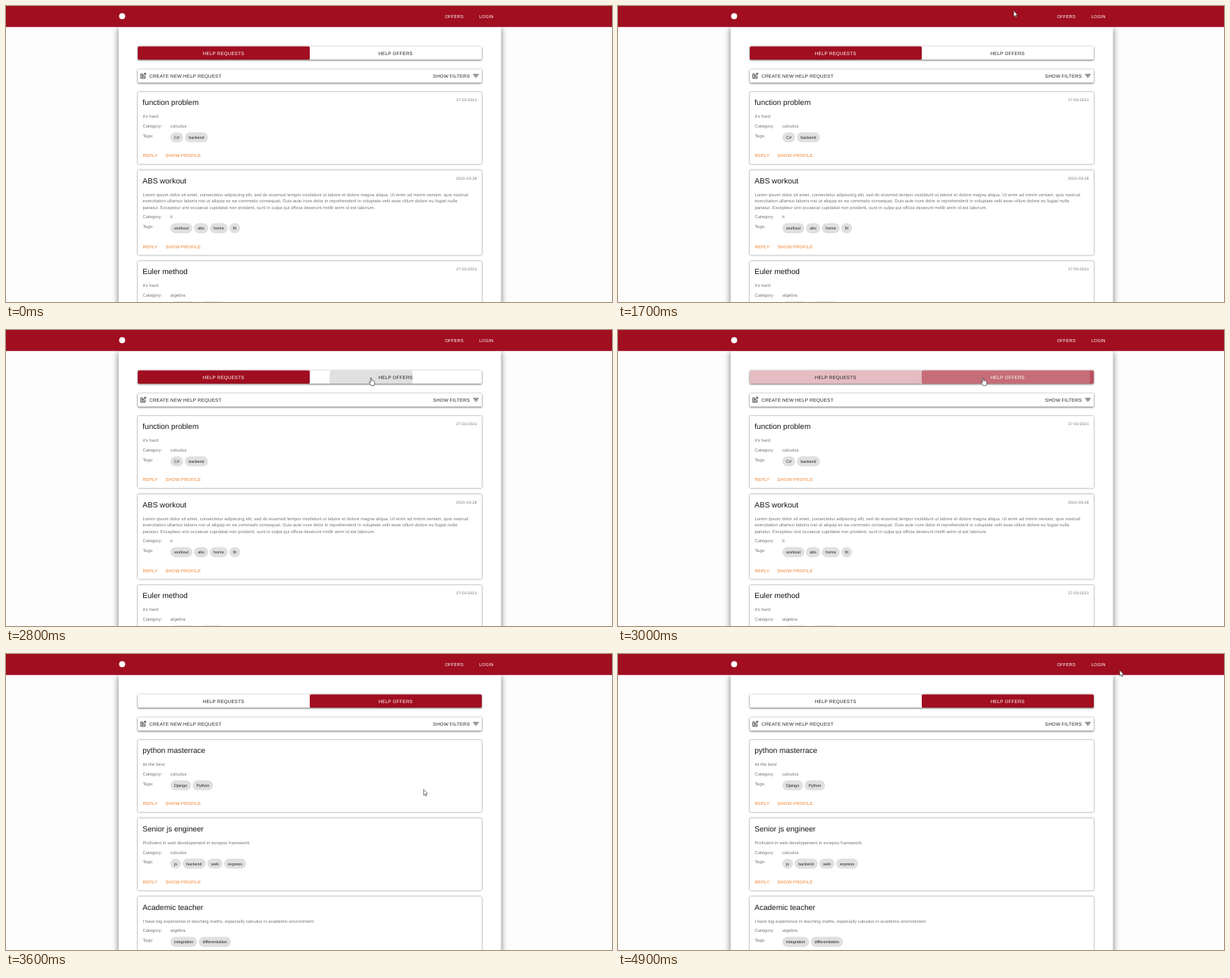
These frames come from a looping animation (800x392 px, 5 s). An HTML page:

```html
<!DOCTYPE html>
<html lang="en">
<head>
<meta charset="utf-8">
<title>Help board</title>
<style>
  html, body { margin: 0; width: 100%; height: 100%; overflow: hidden; background: #fefdfe; }
  svg { display: block; width: 100vw; height: 100vh; }
  text { font-family: "Liberation Sans", Arial, sans-serif; text-rendering: geometricPrecision; white-space: pre; }
  .paper { fill: #fff; filter: drop-shadow(0 .9px .9px rgba(0,0,0,.36)) drop-shadow(0 0 .8px rgba(0,0,0,.2)); }
  .bar { fill: #fff; filter: drop-shadow(0 1px 1.2px rgba(0,0,0,.45)) drop-shadow(0 0 1px rgba(0,0,0,.25)); }
  .page { fill: #fff; filter: drop-shadow(0 1px 4px rgba(0,0,0,.55)); }
  .nav { font-size: 5.83px; letter-spacing: .167px; fill: #fff; }
  .big { font-size: 6.25px; letter-spacing: .179px; fill: #222; }
  .title { font-size: 10px; fill: #151515; }
  .body { font-size: 5.83px; letter-spacing: .0625px; fill: #757575; }
  .date { font-size: 5px; letter-spacing: .167px; fill: #6c6c6c; }
  .link { font-size: 5.83px; letter-spacing: .167px; fill: #ee7d26; }
  .chip { font-size: 5.42px; fill: #222; }
  .pill { fill: #e0e0e0; }
</style>
</head>
<body>
<svg id="stage" viewBox="0 0 800 392" preserveAspectRatio="none"></svg>
<script>
const RED = [160, 14, 32], WHITE = [255, 255, 255];
const LOOP = 5000, STEP = 100;

const text = (cls, x, y, str, extra = '') =>
  `<text class="${cls}" x="${x}" y="${y}" ${extra}>${str}</text>`;
const rect = (x, y, w, h, extra = '') =>
  `<rect x="${x}" y="${y}" width="${w}" height="${h}" ${extra}/>`;

const pen = document.createElement('canvas').getContext('2d');
pen.font = '100px "Liberation Sans", Arial, sans-serif';
const chipWidth = str => pen.measureText(str).width * .0542 + 10;

function chips(y, tags) {
  let x = 217;
  return tags.map(tag => {
    const w = chipWidth(tag);
    const out = rect(x, y, w, 13.4, 'rx="6.7" class="pill"') + text('chip', x + 5, y + 8.6, tag);
    x += w + 2.2;
    return out;
  }).join('');
}

function card(top, { title, date, lines, category, tags }) {
  const low = top + (lines.length - 1) * 8.33;
  return rect(174, top, 454, low - top + 95.4, 'rx="1" class="paper"') +
    text('title', 180.3, top + 17.4, title) +
    (date ? text('date', 621.6, top + 12.4, date, 'text-anchor="end"') : '') +
    lines.map((line, i) => text('body', 180.4, top + 34.5 + i * 8.33, line)).join('') +
    text('body', 180.4, low + 47.1, 'Category:') + text('body', 217, low + 47.1, category) +
    text('body', 180.4, low + 59.8, 'Tags:') + chips(low + 53.3, tags) +
    text('link', 180.6, low + 86.5, 'REPLY') + text('link', 210.5, low + 86.5, 'SHOW PROFILE');
}

function list(items) {
  let top = 113.9;
  return items.map(item => {
    const out = card(top, item);
    top += 103.7 + (item.lines.length - 1) * 8.33;
    return out;
  }).join('');
}

const requests = [
  { title: 'function problem', date: '27-03-2021', lines: ["it's hard"], category: 'calculus', tags: ['C#', 'backend'] },
  { title: 'ABS workout', date: '2021-03-28', category: 'it', tags: ['workout', 'abs', 'home', 'fit'], lines: [
    'Lorem ipsum dolor sit amet, consectetur adipiscing elit, sed do eiusmod tempor incididunt ut labore et dolore magna aliqua. Ut enim ad minim veniam, quis nostrud',
    'exercitation ullamco laboris nisi ut aliquip ex ea commodo consequat. Duis aute irure dolor in reprehenderit in voluptate velit esse cillum dolore eu fugiat nulla',
    'pariatur. Excepteur sint occaecat cupidatat non proident, sunt in culpa qui officia deserunt mollit anim id est laborum.'] },
  { title: 'Euler method', date: '27-03-2021', lines: ["it's hard"], category: 'algebra', tags: ['integration', 'derivatives'] }
];
const offers = [
  { title: 'python masterrace', lines: ['its the best'], category: 'calculus', tags: ['Django', 'Python'] },
  { title: 'Senior js engineer', lines: ['Proficient in web developement in exrepss framework.'], category: 'calculus', tags: ['js', 'backend', 'web', 'express'] },
  { title: 'Academic teacher', lines: ['I have big experience in teaching maths, especially calculus in academic environment'], category: 'algebra', tags: ['integration', 'differentiation'] }
];

const ADD_ICON = 'M17 19.2H5V7h7V5H5c-1.1 0-2 .9-2 2v12c0 1.1.9 2 2 2h12c1.1 0 2-.9 2-2v-7h-2zM19 2h-2v3h-3v2h3v3h2V7h3V5h-3zM7 9h8v2H7zM7 12h8v2H7zM7 15h8v2H7z';
const FILTER_ICON = 'M10 18h4v-2h-4zM3 6v2h18V6zM6 13h12v-2H6z';
const ARROW = 'M.3 .3V8.1L2 6.5 3.1 9.1 4.3 8.6 3.2 6.1H5.5Z';
const HAND = 'M2.2 .9C2.2 0 3.7 0 3.7 .9V4C4.2 3.6 5 3.8 5.1 4.3 5.6 4 6.3 4.2 6.4 4.8 7 4.6 7.7 5 7.7 5.7V7.6C7.7 9 6.9 9.4 6.9 10.6H3C2.9 9.4 1.2 8.3 .4 6.6 .1 5.8 1.1 5.4 1.6 6L2.2 6.7Z';
const icon = (d, x, y) => `<path d="${d}" transform="translate(${x} ${y}) scale(.4167)" fill="#222"/>`;

const middle = 'text-anchor="middle"';
document.getElementById('stage').innerHTML =
  '<clipPath id="tabClip">' + rect(401, 53.5, 227, 17.5, 'rx="1.5"') + '</clipPath>' +
  rect(148.7, 28, 504.8, 400, 'class="page"') +
  rect(0, 0, 800, 27.8, 'fill="#a00e20"') +
  '<circle cx="153.3" cy="13.4" r="4" fill="#fff"/>' +
  text('nav', 579.4, 15.7, 'OFFERS') + text('nav', 624.7, 15.7, 'LOGIN') +
  rect(174, 53.5, 454, 17.5, 'rx="1.5" class="bar"') +
  rect(174, 53.5, 227, 17.5, 'rx="1.5" id="tabA"') +
  rect(401, 53.5, 227, 17.5, 'rx="1.5" id="tabB"') +
  '<g clip-path="url(#tabClip)"><circle id="ripple" cx="482" cy="64" r="0"/></g>' +
  text('big', 287.2, 64.8, 'HELP REQUESTS', middle + ' id="labelA"') +
  text('big', 514.3, 64.8, 'HELP OFFERS', middle + ' id="labelB"') +
  rect(174, 83.8, 454, 17.6, 'rx="1" class="bar"') +
  icon(ADD_ICON, 176.2, 87.4) + icon(FILTER_ICON, 615.3, 87.5) +
  text('big', 189.2, 95, 'CREATE NEW HELP REQUEST') + text('big', 563.8, 95, 'SHOW FILTERS') +
  `<g id="requests">${list(requests)}</g><g id="offers">${list(offers)}</g>` +
  '<path id="cursor" fill="#fff" stroke="#333" stroke-width=".65" stroke-linejoin="round"/>';

// Pointer runs: [step, x, y]; the pointer is hidden between runs.
const runs = [
  [[1, 753, 126], [3, 152, 11]],
  [[6, 173, 59], [7, 762, 119]],
  [[17, 522, 6]],
  [[21, 459, 50], [24, 479, 63], [34, 479, 63], [38, 623, 295], [42, 229, 79], [44, 213, 92], [45, 183, 96], [49, 662, 21]]
];
const HAND_FROM = 22, HAND_TO = 34, SWAP = 35;

// Tab switch: [step, colour progress, ripple radius, ripple opacity]
const tabSteps = [
  [0, 0, 0, 0], [27, 0, 18, .12], [28, 0, 55, .12], [29, .35, 100, .16], [30, .72, 141, .16],
  [31, .9, 195, .12], [32, 1, 240, .06], [33, 1, 240, .03], [34, 1, 0, 0]
];

const el = id => document.getElementById(id);
const mix = (a, b, p) => a + (b - a) * p;
const blend = (a, b, p) => `rgb(${a.map((v, i) => Math.round(mix(v, b[i], p)))})`;

function pointerAt(step) {
  const run = runs.find(r => step >= r[0][0] && step <= r[r.length - 1][0]);
  if (!run) return null;
  const i = run.findIndex(k => k[0] >= step);
  const b = run[i], a = run[i - 1] || b;
  const p = a === b ? 1 : (step - a[0]) / (b[0] - a[0]);
  return [mix(a[1], b[1], p), mix(a[2], b[2], p)];
}

function draw(step) {
  const [, p, radius, alpha] = tabSteps.filter(s => s[0] <= step).pop();
  const picked = p > 0;
  el('tabA').style.fill = blend(RED, WHITE, p);
  el('tabB').style.fill = blend(WHITE, RED, p);
  el('labelA').style.fill = picked ? '#222' : '#fff';
  el('labelB').style.fill = picked ? '#fff' : '#222';
  el('ripple').setAttribute('r', radius);
  el('ripple').style.fill = picked ? '#fff' : '#000';
  el('ripple').style.opacity = alpha;

  el('requests').style.display = step < SWAP ? '' : 'none';
  el('offers').style.display = step < SWAP ? 'none' : '';

  const at = pointerAt(step), cursor = el('cursor');
  cursor.style.display = at ? '' : 'none';
  if (at) {
    cursor.setAttribute('d', step >= HAND_FROM && step <= HAND_TO ? HAND : ARROW);
    cursor.setAttribute('transform', `translate(${at[0]} ${at[1]})`);
  }
}

let start = null, last = -1;
function tick(now) {
  if (start === null) start = now;
  const step = Math.floor(((now - start) % LOOP) / STEP);
  if (step !== last) draw(last = step);
  requestAnimationFrame(tick);
}
draw(0);
requestAnimationFrame(tick);
</script>
</body>
</html>
```
